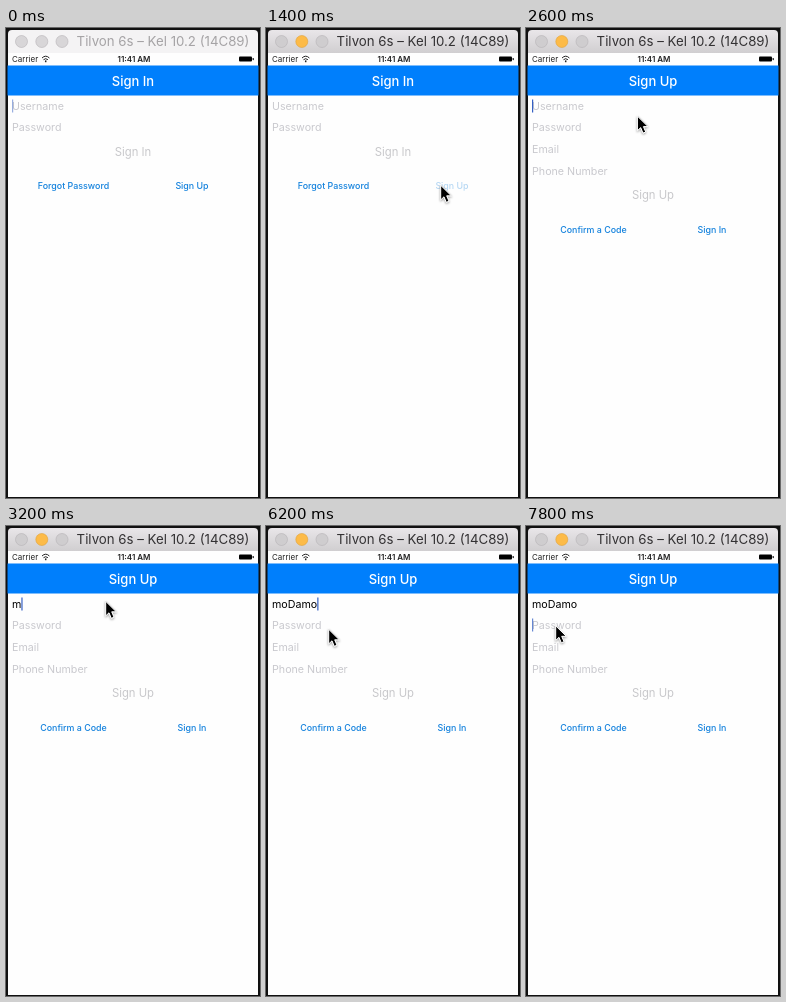
Recreate the animation shown at these times as an HTML page. Size 254 by 470 pixels, loop 8 s.

```html
<!DOCTYPE html>
<html lang="en">
<head>
<meta charset="utf-8">
<title>Sign-up form</title>
<style>
  html, body { margin: 0; width: 100%; height: 100%; overflow: hidden; background: #111; }
  svg { display: block; width: 100%; height: 100%; font-family: Inter, Roboto, sans-serif; }
  .mid { text-anchor: middle; }
  .nav { font-size: 13px; font-weight: 500; fill: #fff; }
  .field { font-size: 10.7px; fill: #c9c9ce; }
  .button { font-size: 11.3px; fill: #c8c8cb; }
  .link { font-size: 8.9px; font-weight: 500; fill: #1482dd; }
  .status { font-size: 8px; fill: #222; }
  #name { fill: #000; }
</style>
</head>
<body>
<svg viewBox="0 0 254 470">
  <defs>
    <linearGradient id="chrome" x2="0" y2="1">
      <stop stop-color="#e9e6e9"/>
      <stop offset="1" stop-color="#d0ced0"/>
    </linearGradient>
  </defs>
  <rect width="254" height="470" fill="#111"/>
  <path id="bar" d="M2 25V6q0-4 4-4H248q4 0 4 4V25Z"/>
  <g stroke-width=".6">
    <circle class="light" cx="15.5" cy="13.5" r="6"/>
    <circle class="light" id="amber" cx="35.8" cy="13.5" r="6"/>
    <circle class="light" cx="56" cy="13.5" r="6"/>
  </g>
  <text id="title" class="mid" x="157" y="18" font-size="13.25">Tilvon 6s – Kel 10.2 (14C89)</text>

  <rect x="2" y="25" width="250" height="444" fill="#fefefe"/>
  <text class="status" x="6" y="34">Carrier</text>
  <g fill="none" stroke="#222" stroke-width="1">
    <path d="M36 30q3.7-3.6 7.4 0M37.5 31.7q2.2-2 4.4 0"/>
    <path d="M39.7 32.4v1.8" stroke-width="1.5"/>
  </g>
  <text class="status mid" x="128" y="34" font-weight="600">11:41 AM</text>
  <rect x="233" y="28.6" width="13" height="5" rx="1"/>
  <rect x="246.6" y="30" width="1.2" height="2.2" rx=".6"/>
  <rect x="1.5" y="37.5" width="251" height="30" fill="#007ffc"/>

  <g id="signIn">
    <text class="nav mid" x="127" y="57.6">Sign In</text>
    <text class="field" x="6" y="81.7">Username</text>
    <text class="field" x="6" y="103.3">Password</text>
    <text class="button mid" x="127" y="127.8">Sign In</text>
    <text class="link mid" x="67.5" y="161">Forgot Password</text>
    <text class="link mid" id="signUpLink" x="186" y="161">Sign Up</text>
  </g>
  <g id="signUp">
    <text class="nav mid" x="127" y="57.6">Sign Up</text>
    <text class="field" id="name" x="6" y="81.7"></text>
    <text class="field" id="hint" x="6" y="81.7">Username</text>
    <text class="field" x="6" y="103.3">Password</text>
    <text class="field" x="6" y="125">Email</text>
    <text class="field" x="6" y="146.7">Phone Number</text>
    <text class="button mid" x="127" y="171">Sign Up</text>
    <text class="link mid" x="67.5" y="204.5">Confirm a Code</text>
    <text class="link mid" x="186" y="204.5">Sign In</text>
  </g>
  <rect id="caret" width="1.2" height="13" fill="#3560c4"/>
  <g id="pointer">
    <path id="arrow" d="M0 0V14.6L3.3 11.5 5.6 17 8.3 15.9 6 10.5H10.6Z" stroke="#fff"/>
    <use href="#arrow"/>
  </g>
</svg>
<script>
  const LOOP = 8000, TICK = 200, NAME = 'moDamo';
  const $ = id => document.getElementById(id);
  const show = (el, on) => el.setAttribute('visibility', on ? 'visible' : 'hidden');

  // Pointer stops: time, x, y
  const stops = [
    [0, 260, 152], [600, 212, 167], [1200, 174.7, 157.3], [2000, 174.7, 157.3],
    [2800, 99.7, 75.3], [5000, 99.7, 75.3], [5400, 108, 80], [6200, 62.7, 103.3],
    [7000, 29.7, 99.8], [LOOP, 29.7, 99.8]
  ];
  const keyTimes = [3200, 3600, 4000, 4200, 4400, 4600];
  // Caret states: time, opacity
  const blinks = [
    [0, .5], [200, 0], [600, 1], [1000, 0], [1600, 1], [2200, 0], [2600, 1],
    [5400, 0], [6000, 1], [6600, 0], [7000, 1], [7400, 0], [7800, .75]
  ];

  function pointerAt(t) {
    const i = stops.findIndex(s => s[0] > t);
    const [t0, x0, y0] = stops[i - 1], [t1, x1, y1] = stops[i];
    const p = (t - t0) / (t1 - t0), k = p * p * (3 - 2 * p);
    return [x0 + (x1 - x0) * k, y0 + (y1 - y0) * k];
  }

  function draw() {
    // The screen refreshes five times a second
    const t = Math.floor(performance.now() % LOOP / TICK) * TICK;
    const active = t >= 1400, registering = t >= 1600, onPassword = t >= 7000;

    $('bar').setAttribute('fill', active ? 'url(#chrome)' : '#f4f3f4');
    $('title').setAttribute('fill', active ? '#333133' : '#a5a3a5');
    for (const light of document.querySelectorAll('.light')) {
      const amber = active && light.id === 'amber';
      light.setAttribute('fill', amber ? '#fdbb48' : active ? '#cfcdcf' : '#d8d6d8');
      light.setAttribute('stroke', amber ? '#dfa23a' : '#b5b3b5');
    }

    show($('signIn'), !registering);
    show($('signUp'), registering);
    $('signUpLink').setAttribute('opacity', active ? .3 : 1);

    const typed = NAME.slice(0, keyTimes.filter(k => k <= t).length);
    $('name').textContent = typed;
    show($('hint'), registering && !typed);

    const caret = $('caret');
    const end = typed && !onPassword ? $('name').getComputedTextLength() : 0;
    caret.setAttribute('x', 6 + end);
    caret.setAttribute('y', onPassword ? 92.5 : 71.5);
    caret.setAttribute('opacity', blinks.filter(b => b[0] <= t).pop()[1]);

    $('pointer').setAttribute('transform', `translate(${pointerAt(t)})`);
    requestAnimationFrame(draw);
  }

  // Soft shadow below the arrow
  $('pointer').style.filter = 'drop-shadow(.5px 1px .8px rgba(0, 0, 0, .35))';
  draw();
</script>
</body>
</html>
```
